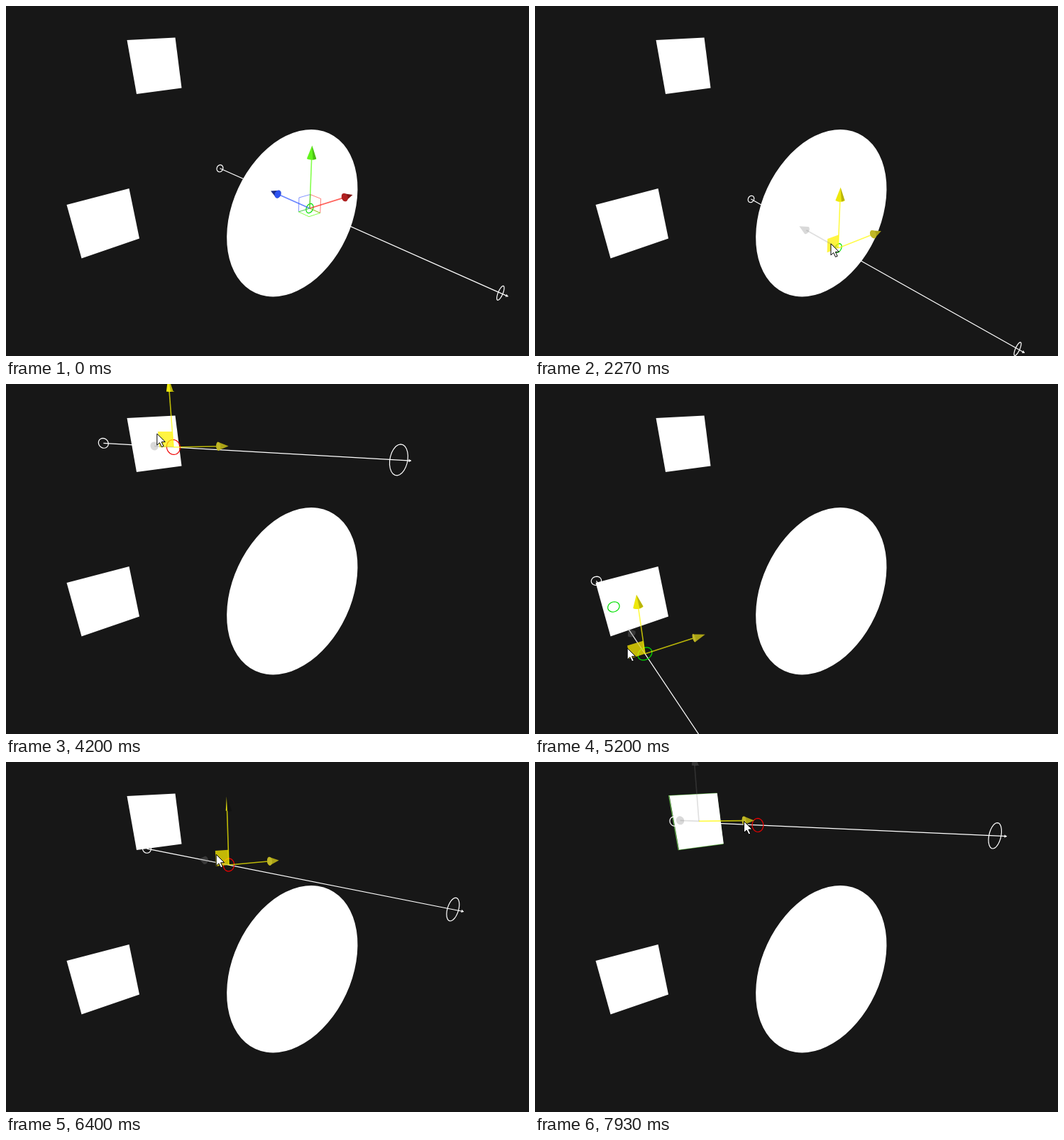
An HTML page with a canvas for the animation above (8 s loop, 737 by 493 pixels).

```html
<!DOCTYPE html>
<html>
<head>
<meta charset="utf-8">
<style>
html, body { margin: 0; width: 100%; height: 100%; overflow: hidden; background: #171717; }
canvas { display: block; }
</style>
</head>
<body>
<canvas id="stage" width="737" height="493"></canvas>
<script>
const ctx = document.getElementById('stage').getContext('2d');
const LOOP = 8000, FPS = 15;

// Camera: 50 degree lens, pitched down, turned around the vertical axis.
const CX = 368.5, CY = 246.5, FOCAL = 528.6;
const PITCH = Math.atan(0.3288), YAW = 0.645;
const sp = Math.sin(PITCH), cp = Math.cos(PITCH), sy = Math.sin(YAW), cy = Math.cos(YAW);
const AXES = {
  x: [cy, -sp * sy, cp * sy],
  y: [0, -cp, -sp],
  z: [-sy, -sp * cy, cp * cy]
};
const PLANE = 1.42;      // distance of the plane the ray is dragged in
const RING = 0.0275;     // radius of the ray markers
const HANDLE = 0.171;    // gizmo size relative to depth
const GRAB = [-0.062, 0.05];

const HANDLE_COLORS = {
  x: { line: 'rgba(255,30,20,.7)', base: '#b02020', side: '#841616' },
  y: { line: 'rgba(80,255,0,.7)', base: '#4fc010', side: '#62f41c' },
  z: { line: 'rgba(40,80,255,.7)', base: '#2c52f0', side: '#1a2c88' }
};
const LIT = {
  x: { line: 'rgba(255,250,0,.7)', base: '#c0b726', side: '#aaa216' },
  y: { line: 'rgba(255,250,0,.72)', base: '#b5ae10', side: '#eee80c' },
  z: { line: 'rgba(255,250,0,.7)', base: '#d8d020', side: '#a8a014' }
};
const DIM = { line: 'rgba(128,128,128,.25)', side: 'rgba(128,128,128,.3)' };

// Keys: time, x, y
const RAY_PATH = [
  [1670, 428, 285], [1930, 392, 277], [2267, 427.3, 341], [2530, 441, 336],
  [2860, 346, 262], [3133, 296, 214], [3400, 320, 125], [3800, 286, 96],
  [4200, 236, 89], [4530, 196, 190], [4930, 148, 350], [5200, 155, 380],
  [5600, 215, 368], [6000, 281, 322], [6400, 314, 145], [6930, 314, 89]
];
const APPROACH = [[600, 672, 3], [1270, 427, 286], [1400, 416, 278]];
const LEAVE = [[6930, 295, 74], [7130, 222, 98], [7270, 222, 98], [7600, 275, 83]];

const SQUARE_A = [[170.5, 48], [238.5, 44.5], [247.5, 115.5], [184, 124]];
const SQUARE_B = [[85.5, 280], [173.5, 257], [188, 327.5], [106.5, 355.5]];

// Hermite curve through the keys, at rest on both ends.
function follow(keys, t) {
  const last = keys.length - 1;
  if (t <= keys[0][0]) return keys[0].slice(1);
  if (t >= keys[last][0]) return keys[last].slice(1);
  let i = 0;
  while (t >= keys[i + 1][0]) i++;
  const a = keys[i], b = keys[i + 1], span = b[0] - a[0], u = (t - a[0]) / span;
  const slope = (k, d) => k === 0 || k === last ? 0 :
    (keys[k + 1][d] - keys[k - 1][d]) / (keys[k + 1][0] - keys[k - 1][0]);
  const u2 = u * u, u3 = u2 * u;
  return [1, 2].map(d =>
    (2 * u3 - 3 * u2 + 1) * a[d] + (u3 - 2 * u2 + u) * span * slope(i, d) +
    (3 * u2 - 2 * u3) * b[d] + (u3 - u2) * span * slope(i + 1, d));
}

const dot = (a, b) => a[0] * b[0] + a[1] * b[1] + a[2] * b[2];
const add = (p, ...terms) => terms.reduce(
  (q, [dir, k]) => q.map((v, i) => v + dir[i] * k), p);
const project = p => [CX + FOCAL * p[0] / p[2], CY + FOCAL * p[1] / p[2]];
const sight = ([x, y]) => [(x - CX) / FOCAL, (y - CY) / FOCAL, 1];

function onPlane(screen) {
  const v = sight(screen), depth = PLANE / dot(v, AXES.z);
  return v.map(c => c * depth);
}

function trace(points, closed) {
  ctx.beginPath();
  points.forEach(p => ctx.lineTo(p[0], p[1]));
  if (closed) ctx.closePath();
}
function fill(points, color) {
  trace(points, true);
  ctx.fillStyle = color;
  ctx.fill();
}
function stroke(points, color, width = 1, closed = false) {
  trace(points, closed);
  ctx.strokeStyle = color;
  ctx.lineWidth = width;
  ctx.stroke();
}
function circle(center, radius, u, v) {
  return Array.from({ length: 24 }, (_, i) => {
    const a = i / 24 * Math.PI * 2;
    return project(add(center, [u, radius * Math.cos(a)], [v, radius * Math.sin(a)]));
  });
}
function ring(center, color) {
  stroke(circle(center, RING, AXES.x, AXES.y), color, 1.2, true);
}
function inside(points, p) {
  trace(points, true);
  return ctx.isPointInPath(p[0], p[1]);
}
function discPath() {
  ctx.beginPath();
  ctx.ellipse(403.3, 291.7, 83.8, 123.8, 0.4346, 0, Math.PI * 2);
}

function drawRay(origin, screen) {
  const at = z => add(origin, [AXES.z, z]);
  const tip = project(at(-1.025)), start = project(at(1));
  stroke([start, tip], '#fff', 1.2);
  ring(at(1), '#fff');
  ring(at(-1), '#fff');
  const a = Math.atan2(tip[1] - start[1], tip[0] - start[0]);
  const barb = s => [tip[0] - 4 * Math.cos(a + s), tip[1] - 4 * Math.sin(a + s)];
  fill([barb(0.6), tip, barb(-0.6)], '#fff');

  discPath();
  const hitsDisc = ctx.isPointInPath(screen[0], screen[1]);
  const near = at(0.546), hitsSquare = inside(SQUARE_B, project(near));
  if (hitsSquare) ring(near, '#00e000');
  ring(origin, hitsDisc || hitsSquare ? '#00e000' : '#f00000');
}

function drawHandle(origin, name, colors) {
  const dir = AXES[name], [u, v] = ['x', 'y', 'z'].filter(n => n !== name).map(n => AXES[n]);
  const baseAt = add(origin, [dir, HANDLE * 0.8]);
  const tip = project(add(origin, [dir, HANDLE]));
  const base = circle(baseAt, HANDLE * 0.07, u, v), mid = project(baseAt);
  stroke([project(origin), mid], colors.line, 1.6);

  // Cone outline: the half of the base facing the tip collapses into it.
  const ax = tip[0] - mid[0], ay = tip[1] - mid[1], pointed = Math.hypot(ax, ay) > 7;
  const ahead = p => ax * (p[0] - mid[0]) + ay * (p[1] - mid[1]) > 1;
  fill(base.map(p => pointed && ahead(p) ? tip : p), colors.side);
  if (colors === DIM) return;
  if (name === 'y') {
    const right = base.reduce((a, b) => a[0] > b[0] ? a : b);
    fill([tip, right, [mid[0] + 2, mid[1] + 2]], 'rgba(0,0,0,.22)');
  } else {
    fill(base, colors.base);
  }
}

function drawGizmo(screen, hover) {
  const origin = sight(screen), size = HANDLE * 0.23;
  const quad = (a, ka, b, kb) => [
    origin, add(origin, [a, ka]), add(origin, [a, ka], [b, kb]), add(origin, [b, kb])
  ].map(project);
  const { x, y, z } = AXES;
  const front = quad(x, -size, y, size);
  if (!hover) {
    stroke(quad(z, -size, y, size), 'rgba(255,40,30,.6)', 1, true);
    stroke(front, 'rgba(50,80,255,.6)', 1, true);
    stroke(quad(x, -size, z, -size), 'rgba(80,255,0,.7)', 1, true);
  }
  if (hover === 'xy') fill(front, 'rgba(255,240,0,.74)');
  for (const name of ['z', 'x', 'y']) {
    const colors = !hover ? HANDLE_COLORS[name] : hover.includes(name) ? LIT[name] : DIM;
    drawHandle(origin, name, colors);
  }
}

function drawCursor([x, y]) {
  const shape = [[0, 0], [0, 16], [3.7, 12.6], [6.6, 18.6], [9.2, 17.4], [6.4, 11.6], [11.5, 11.4]]
    .map(p => [x + p[0] + 0.5, y + p[1] + 0.5]);
  fill(shape, '#fff');
  stroke(shape, '#000', 1, true);
}

function cursorAt(t, origin) {
  if (t < 600) return null;
  if (t < 1660) return follow(APPROACH, t);
  if (t < 6930) return project(add(origin, [AXES.x, GRAB[0]], [AXES.y, GRAB[1]]));
  return follow(LEAVE, t);
}

function hoverAt(t) {
  if (t < 1330) return '';
  if (t < 1460) return 'xyz';
  if (t < 6995) return 'xy';
  return t < 7530 ? '' : 'x';
}

function draw(t) {
  const screen = follow(RAY_PATH, t), origin = onPlane(screen);
  const shift = 19 * Math.min(1, Math.max(0, (t - 7800) / 133));
  const selected = t >= 7200;

  ctx.fillStyle = '#171717';
  ctx.fillRect(0, 0, 737, 493);
  discPath();
  ctx.fillStyle = '#fff';
  ctx.fill();
  fill(SQUARE_B, '#fff');
  const square = SQUARE_A.map(([x, y]) => [x + shift * (x > 200 ? 0.96 : 1), y - shift * 0.02]);
  if (selected) stroke(square.map(([x, y]) => [x - 0.8, y]), '#62b848', 1.2, true);
  fill(square, '#fff');

  drawRay(origin, screen);
  drawGizmo(selected ? [212 + shift, 83.4] : screen, hoverAt(t));
  const cursor = cursorAt(t, origin);
  if (cursor) drawCursor([cursor[0] + shift, cursor[1]]);
}

// Steps begin up to a few ms early, as their times are rounded to 10 ms.
const begin = performance.now();
function tick() {
  const t = (performance.now() - begin) % LOOP;
  draw(Math.floor(t * FPS / 1000 + 0.06) * 1000 / FPS);
  requestAnimationFrame(tick);
}
tick();
</script>
</body>
</html>
```
